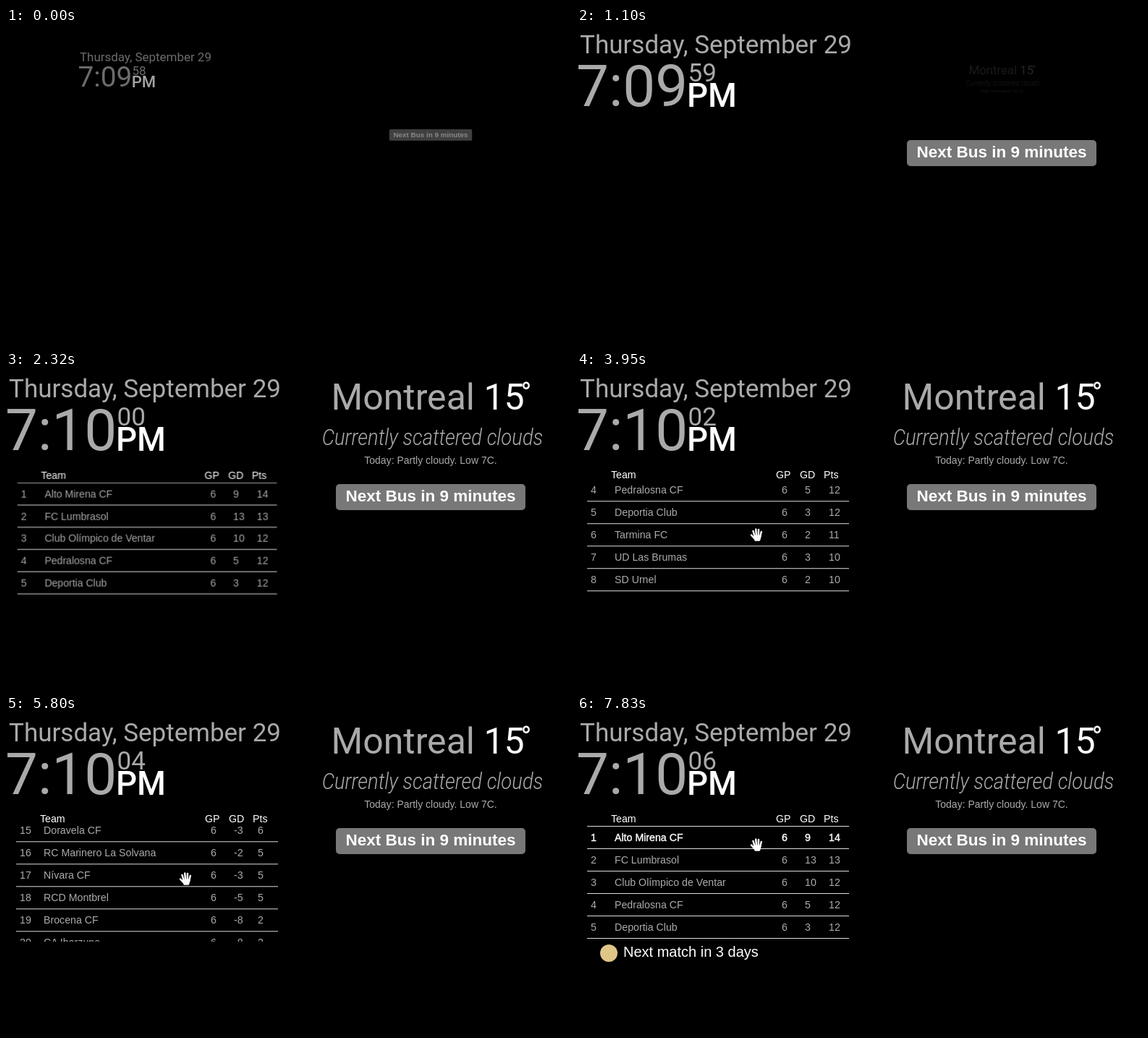
These frames come from a looping animation (781 by 437 pixels, 8 s). An HTML page:

```html
<!DOCTYPE html>
<html lang="en">
<head>
<meta charset="utf-8">
<title>Smart mirror</title>
<style>
  html, body { margin: 0; width: 100%; height: 100%; overflow: hidden; background: #000; }
  svg { display: block; width: 100%; height: 100%; fill: #aaa; font-family: "Liberation Sans", Arial, sans-serif; }
  .roboto { font-family: Roboto, sans-serif; }
  .bright { fill: #fff; }
  .middle { text-anchor: middle; }

  /* All animations are paused; the script sets their time within the loop. */
  .zoom { animation: zoom 1s ease both paused; }
  #clock { transform-origin: 194px 56px; animation-delay: -185ms; }
  #bus { transform-origin: 587px 144px; animation-delay: -155ms; }
  #weather { transform-origin: 588px 70px; animation-delay: 1035ms; }
  #league { transform-origin: 195px 225px; animation-delay: 1467ms; }
  #busSlot { animation: drop 1ms 1050ms step-start both paused; }
  #rows { animation: scroll 8s ease-in-out both paused; }
  #hand { animation: point 8s ease-in-out both paused; }
  #rows g:first-of-type { animation: pick 1ms 7600ms step-start both paused; }
  #match { animation: show 1ms 7600ms step-start both paused; }
  #rows path { stroke: #ddd; stroke-width: 1px; }

  .condensed {
    font: italic 300 31px Roboto, sans-serif;
    transform-origin: 589px 0;
    transform: scaleX(.885);
  }

  @keyframes zoom {
    from { opacity: 0; transform: scale(.3); }
    50% { opacity: 1; }
    to { opacity: 1; transform: scale(1); }
  }
  @keyframes drop { from { transform: none; } to { transform: translateY(20px); } }
  @keyframes pick { to { fill: #fff; stroke: #fff; stroke-width: .4px; } }
  @keyframes show { from { opacity: 0; } to { opacity: 1; } }
  @keyframes scroll {
    0%, 46.25% { transform: translateY(0); }
    49.5% { transform: translateY(-98px); }
    52.875%, 56.125% { transform: translateY(-200px); }
    58.625% { transform: translateY(-300px); }
    61.125%, 63% { transform: translateY(-400px); }
    65.25%, 71.69% { transform: translateY(-460px); }
    74.625% { transform: translateY(-360px); }
    77.625% { transform: translateY(-260px); }
    80.625%, 81% { transform: translateY(-160px); }
    84.625%, 100% { transform: translateY(0); }
  }
  @keyframes point {
    0%, 37.375% { transform: translate(-12px, 212px); }
    43.625%, 86.875% { transform: translate(248px, 225px); }
    91.875%, 100% { transform: translate(248px, 178px); }
  }
</style>
</head>
<body>
<svg viewBox="0 0 781 437">
  <clipPath id="view"><path d="M0 152H400V312H0Z"/></clipPath>

  <g id="clock" class="zoom roboto">
    <text x="4" y="35" font-size="35">Thursday, September 29</text>
    <text id="time" x="-1" y="108" font-size="80">7:09</text>
    <text id="seconds" x="153.5" y="74" font-size="35">58</text>
    <text class="bright" x="152" y="109" font-size="45.5" font-weight="500">PM</text>
  </g>

  <g id="weather" class="zoom">
    <g class="roboto" font-size="50">
      <text x="449.5" y="51.5">Montreal</text>
      <text class="bright" x="660.5" y="51.5">15</text>
      <text class="bright" x="711.5" y="42.5" font-size="40">°</text>
    </g>
    <text class="condensed middle" x="589.5" y="101">Currently scattered clouds</text>
    <text class="middle" x="587" y="127" font-size="14">Today: Partly cloudy. Low 7C.</text>
  </g>

  <g id="busSlot">
    <g id="bus" class="zoom">
      <rect x="456" y="135" width="262" height="36" rx="5" fill="#787878"/>
      <text class="bright middle" x="587" y="159" font-size="22.5" font-weight="bold">Next Bus in 9 minutes</text>
    </g>
  </g>

  <g id="league" class="zoom" font-size="14.2">
    <g class="bright">
      <text x="47" y="147">Team</text>
      <text x="275" y="147">GP</text>
      <text x="308" y="147">GD</text>
      <text x="341" y="147">Pts</text>
    </g>
    <g clip-path="url(#view)"><g id="rows"></g></g>
  </g>

  <g id="match">
    <circle cx="44" cy="328" r="12" fill="#dfc587"/>
    <text class="bright" x="64" y="333" font-size="20">Next match in 3 days</text>
  </g>

  <g id="hand" fill="#fff" stroke="#fff" stroke-width="2.5" stroke-linecap="round" stroke-linejoin="round">
    <path d="M-4.5-5L-2.5 2M-.8-7.5L0 2M3-7L2.7 2M6.8-4L5 3M-7 .5L-3 5"/>
    <path d="M-3 2H5.5L4 7.5H-1.5Z"/>
  </g>
</svg>
<script>
  const LOOP = 8000, ROW_HEIGHT = 31;
  const byId = id => document.getElementById(id);

  // name | goal difference | points
  const teams = `Alto Mirena CF|9|14
FC Lumbrasol|13|13
Club Olímpico de Ventar|10|12
Pedralosna CF|5|12
Deportia Club|3|12
Tarmina FC|2|11
UD Las Brumas|3|10
SD Urnel|2|10
Real Vintosa|1|10
CD Orvella|0|10
Real Ostaria|-2|8
RC Brismar|-2|7
Sporting Nalia|-5|7
Deportes Arlezo|-1|6
Doravela CF|-3|6
RC Marinero La Solvana|-2|5
Nívara CF|-3|5
RCD Montbrel|-5|5
Brocena CF|-8|2
CA Ibarzune|-8|2`.split('\n').map(line => line.split('|'));

  const columns = [19, 52, 283, 315, 348];
  const rule = y => `<path d="M14 ${y}H376"/>`;

  byId('rows').innerHTML = rule(152.5) + teams.map(([name, diff, points], i) => {
    const y = i * ROW_HEIGHT;
    const cells = [i + 1, name, 6, diff, points]
      .map((value, c) => `<text x="${columns[c]}" y="${y + 173}">${value}</text>`);
    return `<g>${cells.join('')}${rule(y + 183.5)}</g>`;
  }).join('');

  const animations = document.getAnimations();
  const start = performance.now();

  function draw() {
    const t = (performance.now() - start) % LOOP;
    for (const animation of animations) animation.currentTime = t;
    const seconds = 58 + Math.floor((t + 250) / 1000);
    byId('time').textContent = seconds < 60 ? '7:09' : '7:10';
    byId('seconds').textContent = String(seconds % 60).padStart(2, '0');
    requestAnimationFrame(draw);
  }
  draw();
</script>
</body>
</html>
```
